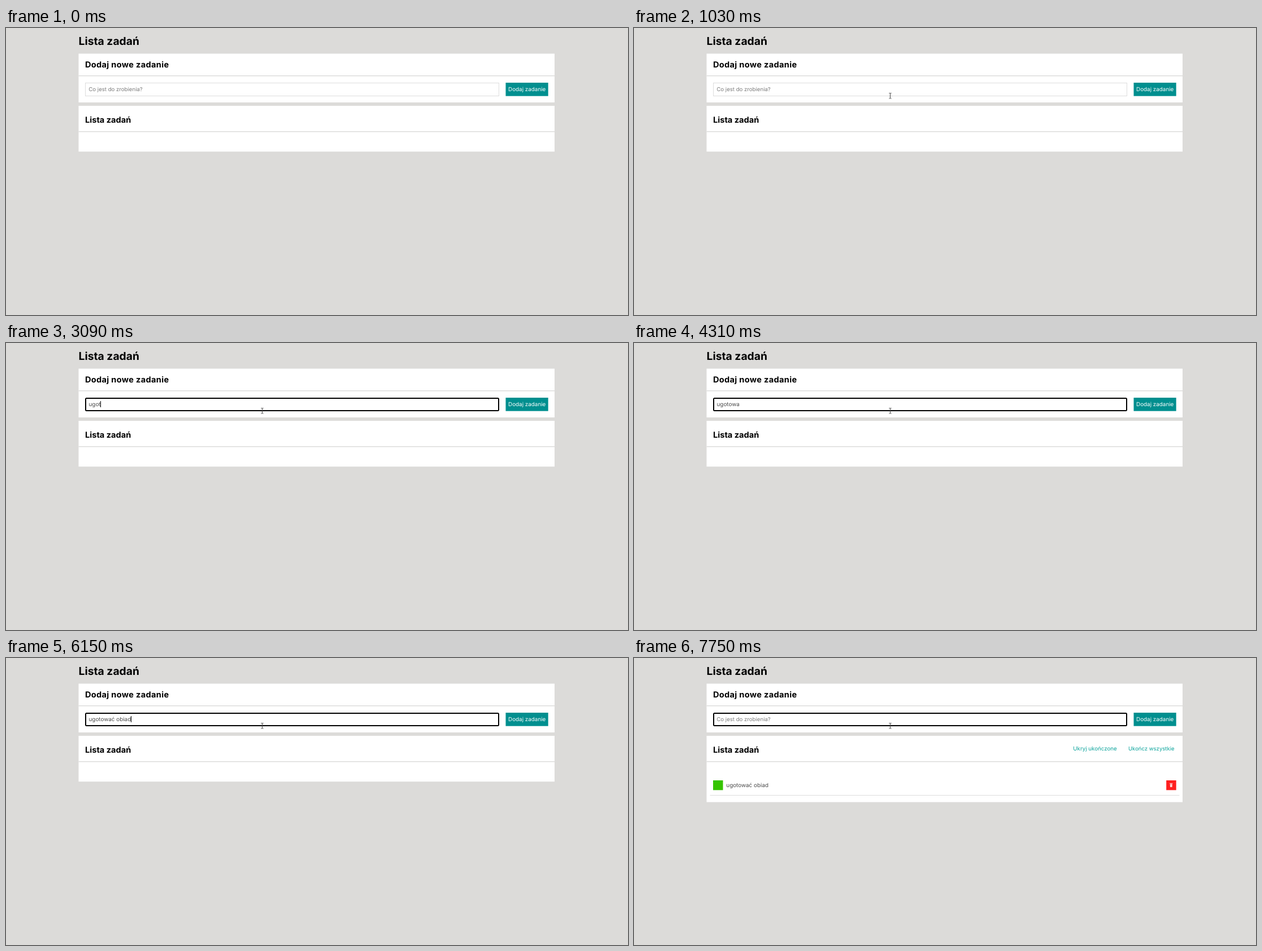
An HTML page for the animation above (8000 ms loop, 1101x509 px).

```html
<!DOCTYPE html>
<html lang="pl">
<head>
<meta charset="utf-8">
<title>Lista zadań</title>
<style>
  html, body { margin: 0; width: 100%; height: 100%; overflow: hidden; background: #dcdbd9; }
  svg { display: block; width: 1101px; height: 509px; }
  text { font: 9.75px Inter, "Open Sans", sans-serif; text-rendering: geometricPrecision; white-space: pre; }
  .title { font-size: 19.3px; font-weight: 700; }
  .head { font-size: 14.6px; font-weight: 700; }
  .wide { letter-spacing: .3px; }
  .panel { fill: #fff; }
  .rule { fill: #dddddc; }
  .button { fill: #008f8f; }
  .button + text { fill: #fff; font-size: 9.9px; }
  .link { fill: #0aa39b; }
  .task { fill: #4a4a4a; font-size: 9.9px; }
  #hint { fill: #7b7b7b; font-size: 9.65px; }
  #field { fill: #fff; stroke: #ddd; }
  #field.focus { stroke: #000; stroke-width: 2px; }
  #arrow { fill: #fff; stroke: #222; stroke-width: .9px; }
  #beam { fill: none; stroke: #444; }
</style>
</head>
<body>
<svg viewBox="0 0 1101 509">
  <text class="title" x="128.5" y="29.5">Lista zadań</text>

  <rect class="panel" x="128.5" y="45.5" width="842.5" height="86.5"/>
  <text class="head wide" x="140" y="70">Dodaj nowe zadanie</text>
  <rect class="rule" x="128.5" y="84" width="842.5" height="1.5"/>
  <rect id="field"/>
  <text id="hint" x="146.3" y="111.5">Co jest do zrobienia?</text>
  <text id="typed" class="task" x="146.5" y="111.5"></text>
  <rect id="caret" y="103" width="1" height="11"/>
  <rect class="button" x="884.5" y="97" width="75.2" height="23.7"/>
  <text x="889" y="111.5">Dodaj zadanie</text>

  <rect id="list" class="panel" x="128.5" y="138" width="842.5"/>
  <text class="head" x="140" y="168">Lista zadań</text>
  <rect class="rule" x="128.5" y="183" width="842.5" height="1.5"/>

  <g id="item">
    <text class="link" x="777.3" y="163.5">Ukryj ukończone</text>
    <text class="link" x="875" y="163.5" style="font-size:9.55px">Ukończ wszystkie</text>
    <rect x="140" y="217" width="17.5" height="17.3" fill="#36c400"/>
    <text class="task" x="163.3" y="229">ugotować obiad</text>
    <rect x="942.2" y="217" width="17.5" height="17.3" fill="#ff1f1f"/>
    <path d="M948.2 222h5.2v1h-5.2zM948.7 223.5h4.2l-.3 5.5h-3.6z" fill="#ffd0d0"/>
    <rect class="rule" x="134.5" y="243" width="831" height="1"/>
  </g>

  <path id="arrow" d="M.5.5v9l2.1-1.9 1.5 3.2 1.4-.7-1.4-3h2.8z"/>
  <path id="beam" d="M451.5 115.5h1.5l.5.5.5-.5h1.5M453.5 116v8.5M451.5 125h1.5l.5-.5.5.5h1.5"/>
</svg>
<script>
  const LOOP = 8000, FOCUS = 1080, ENTER = 6690;
  const TASK = "ugotować obiad";
  const KEYS = [2170, 2630, 2910, 3090, 3220, 3550, 3760, 4500, 4910, 5230, 5430, 5560, 5690, 6150];
  const BLINKS = [FOCUS, 1580, 2110, 4310, 4500, 6750, 7250, 7750];
  const APPROACH = [[452, 134], [453, 127], [453, 121]];

  const el = id => document.getElementById(id);
  const [field, hint, typed, caret, list, item, arrow, beam] =
    ["field", "hint", "typed", "caret", "list", "item", "arrow", "beam"].map(el);
  const show = (node, on) => { node.style.display = on ? "" : "none"; };
  const countPast = (times, t) => times.filter(at => at <= t).length;

  function setRect(node, x, y, w, h) {
    Object.entries({ x, y, width: w, height: h }).forEach(([k, v]) => node.setAttribute(k, v));
  }

  // The pointer glides in from the lower right, then settles on the field.
  function pointerAt(step) {
    if (step > 8) return APPROACH[step - 9];
    const e = 1 - (1 - step / 8) ** 2;
    return [1038 - 591 * e, 497 - 357 * e];
  }

  function drawPointer(t) {
    const step = Math.floor((t - 70) / 67.5);
    const moving = step >= 0 && step < 12;
    show(arrow, moving);
    show(beam, step >= 12);
    if (moving) arrow.setAttribute("transform", `translate(${pointerAt(step).map(Math.round)})`);
  }

  function drawField(t) {
    const focused = t >= FOCUS;
    field.classList.toggle("focus", focused);
    if (focused) setRect(field, 141, 98, 731, 22);
    else setRect(field, 140.5, 97.5, 732, 23);
    field.setAttribute("rx", focused ? 1.5 : 0);

    const text = t < ENTER ? TASK.slice(0, countPast(KEYS, t)) : "";
    if (typed.textContent !== text) typed.textContent = text;
    show(hint, !text);
    show(caret, countPast(BLINKS, t) % 2 === 1);
    caret.setAttribute("x", 146 + (text ? Math.round(typed.getComputedTextLength()) : 0));
  }

  function drawList(t) {
    const added = t >= ENTER;
    show(item, added);
    list.setAttribute("height", added ? 117.6 : 81.2);
  }

  function draw(t) {
    drawPointer(t);
    drawField(t);
    drawList(t);
  }

  const start = performance.now();
  function tick(now) {
    draw(Math.max(0, now - start) % LOOP);
    requestAnimationFrame(tick);
  }
  draw(0);
  requestAnimationFrame(tick);
</script>
</body>
</html>
```
